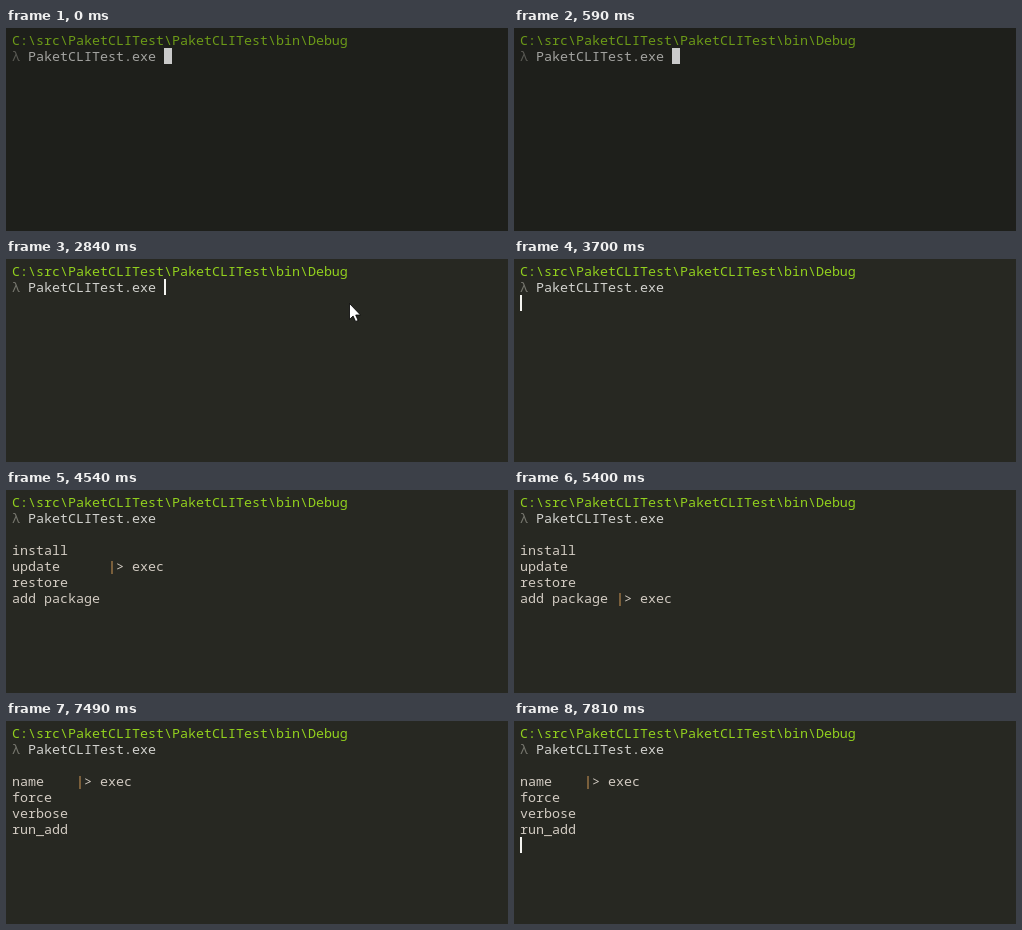
These frames come from a looping animation (502 px wide and 203 px high, 8000 ms). An HTML page:

```html
<!DOCTYPE html>
<html lang="en">
<head>
<meta charset="utf-8">
<title>Terminal menu</title>
<style>
  html, body { margin: 0; width: 100%; height: 100%; overflow: hidden; }
  body {
    position: relative;
    --bg: #272822; --path: #92d01e; --prompt: #77776f; --text: #d2d2ce;
    background: var(--bg);
  }
  body.blurred { --bg: #1e1f1b; --path: #6c9a18; --prompt: #5a5a54; --text: #a3a3a0; }
  pre {
    position: absolute; left: 6px; top: 4px; margin: 0;
    font: 13.333px/16px "Noto Sans Mono", "DejaVu Sans Mono", monospace;
    color: var(--text);
  }
  .path { color: var(--path); }
  .prompt { color: var(--prompt); }
  #menu { top: 52px; color: #d2cbc2; }
  #menu b { font-weight: normal; color: #d29a58; }
  #caret { position: absolute; width: 2px; height: 16px; background: #f4f4f0; }
  .blurred #caret { width: 8px; background: #cacaca; }
  #mouse { position: absolute; left: 0; top: 0; overflow: visible; }
</style>
</head>
<body>
<pre><span class="path">C:\src\PaketCLITest\PaketCLITest\bin\Debug</span>
<span class="prompt">λ</span> PaketCLITest.exe</pre>
<pre id="menu"></pre>
<div id="caret"></div>
<svg id="mouse" width="12" height="19">
  <path d="M.5 .5V16.4L4.1 13 6.6 18.5 9.1 17.4 6.7 12H11.5Z" fill="#fff" stroke="#000" stroke-width=".8"/>
</svg>
<script>
const LOOP = 8000;
const $ = id => document.getElementById(id);
const menu = $('menu'), caret = $('caret'), mouse = $('mouse');

const commands = ['install', 'update', 'restore', 'add package'];
const options = ['name', 'force', 'verbose', 'run_add'];

// [start, items, selected row]
const screens = [
  [0, [], 0],
  [3850, commands, 0], [4540, commands, 1], [4850, commands, 2], [5230, commands, 3],
  [6250, options, 0], [7580, options, 1], [7810, options, 0]
];
// [start, x, y]; no position means the caret is off
const carets = [
  [0, 158, 20], [3240], [3700, 6, 36], [3850, 6, 116], [4310], [4850, 6, 116],
  [5400], [5950, 6, 116], [6480], [6960, 6, 116], [7490], [7580, 6, 116]
];

const at = (list, t) => list.filter(e => e[0] <= t).pop();

function menuHtml(items, selected) {
  const width = Math.max(...items.map(s => s.length)) + 1;
  return items.map((s, i) =>
    i === selected ? s.padEnd(width) + '<b>|</b>&gt; exec' : s).join('\n');
}

function mousePos(t) {
  if (t >= 70 && t < 590) {
    const p = Math.floor((t - 70) / 74.3) / 6;
    return [413 + 82 * p * p, 190 - 131 * (1 - (1 - p) ** 2)];
  }
  if (t >= 2460 && t < 2920) {
    const p = Math.min(5, Math.floor((t - 2460) / 76)) / 5;
    return [462 - 119 * (1 - (1 - p) ** 2), 45 - p];
  }
}

let shown;
function draw(t) {
  document.body.classList.toggle('blurred', t < 2764);

  const screen = at(screens, t);
  if (screen !== shown) {
    shown = screen;
    menu.innerHTML = menuHtml(screen[1], screen[2]);
  }

  const [, x, y] = at(carets, t);
  caret.hidden = x === undefined;
  caret.style.left = x + 'px';
  caret.style.top = y + 'px';

  const pos = mousePos(t);
  mouse.style.display = pos ? '' : 'none';
  if (pos) mouse.style.transform = `translate(${pos.map(v => Math.round(v) + 'px')})`;
}

const start = performance.now();
function tick() {
  draw((performance.now() - start) % LOOP);
  requestAnimationFrame(tick);
}
tick();
</script>
</body>
</html>
```
